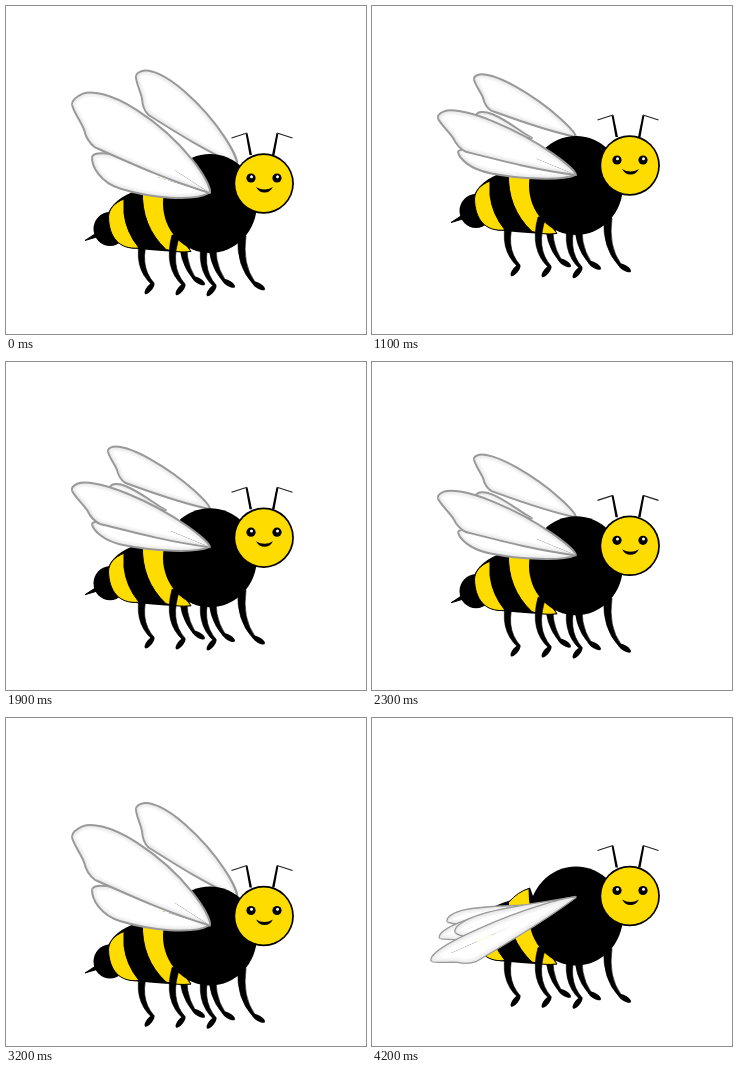
An HTML page with a canvas for the animation above (4300 ms loop, 360 px wide and 328 px high).

```html
<!DOCTYPE html>
<html lang="en">
<head>
<meta charset="utf-8">
<title>Flying bee</title>
<style>
html, body { margin: 0; width: 100%; height: 100%; overflow: hidden; background: #fff; }
canvas { display: block; }
</style>
</head>
<body>
<canvas id="stage" width="360" height="328"></canvas>
<script>
const ctx = document.getElementById('stage').getContext('2d');
const STEP = 100, STEPS = 43;
const YELLOW = '#ffdc00', BLACK = '#000', WING_EDGE = '#999';

// Wing outlines run from the base (0,0) to the tip (1,0); y is a share of the bulge.
const FORE = new Path2D(`M0 0 C.02 .3 .3 1 .65 1 C.85 1 .95 .7 .98 .47 C1 .3 1.01 .1 1 0
  C.98 -.2 .9 -.4 .853 -.63 C.82 -.85 .79 -.98 .74 -1 C.5 -.75 .25 -.5 0 0Z`);
const HIND = new Path2D(`M0 0 C.2 .2 .5 1 .75 1 C.9 1 1 .6 1 0
  C.98 -.4 .88 -1 .7 -1 C.45 -1 .1 -.6 0 0Z`);

const wing = (outline, base, tip, above, below) => ({ outline, base, tip, above, below });

// Each pose lists its wings from back to front.
const UP = {
  back: [wing(FORE, [231, 159], [130, 70], 20.5, 21)],
  front: [
    wing(HIND, [203, 187], [86, 151], 9, 22),
    wing(FORE, [204, 187], [66, 98], 30, 24)
  ]
};
const MID = {
  back: [
    wing(HIND, [160, 150], [104, 127], 7, 6),
    wing(FORE, [204, 149], [102, 91], 14, 19)
  ],
  front: [
    wing(HIND, [203, 187], [86, 164], 6, 14.5),
    wing(FORE, [204, 187], [66, 130], 18, 20.5)
  ]
};
const DOWN = {
  back: [],
  front: [
    wing(HIND, [160, 186], [75, 203], 8, 6),
    wing(FORE, [160, 188], [68, 220], 9, 10),
    wing(HIND, [204, 178], [83, 214], 10, 12),
    wing(FORE, [204, 179], [60, 243], 11, 18)
  ]
};
const FLAP = [UP, MID, DOWN, MID];

// The bee rises, sinks and returns at an even pace.
function heightAt(step) {
  if (step < 10) return -2 * step;
  if (step < 31) return -20 + 42.5 * (step - 10) / 21;
  return 22.5 - 2 * (step - 31);
}

function outline(path, color, width) {
  ctx.strokeStyle = color;
  ctx.lineWidth = width;
  ctx.stroke(path);
}

function shape(d, fill, width = 0) {
  const path = new Path2D(d);
  ctx.fillStyle = fill;
  ctx.fill(path);
  if (width) outline(path, BLACK, width);
}

function ellipse(x, y, rx, ry, fill, angle = 0) {
  ctx.beginPath();
  ctx.ellipse(x, y, rx, ry, angle, 0, Math.PI * 2);
  ctx.fillStyle = fill;
  ctx.fill();
}

// Scales one half of an outline: side 1 is above the axis, -1 below.
function placeWing({ outline, base, tip, above, below }) {
  const dx = tip[0] - base[0], dy = tip[1] - base[1], length = Math.hypot(dx, dy);
  const half = (side, bulge) => {
    const clip = new Path2D(), placed = new Path2D();
    const nx = -dy / length, ny = dx / length;
    const matrix = new DOMMatrix([dx, dy, nx * bulge, ny * bulge, base[0], base[1]]);
    const box = new Path2D();
    box.rect(-1, side > 0 ? 0 : -3, 3, 3);
    clip.addPath(box, matrix);
    placed.addPath(outline, matrix);
    return { clip, placed };
  };
  return [half(1, above), half(-1, below)];
}

function drawWing(spec, edgeWidth) {
  for (const { clip, placed } of placeWing(spec)) {
    ctx.save();
    ctx.clip(clip);
    ctx.fillStyle = '#fff';
    ctx.fill(placed);
    ctx.save();
    ctx.clip(placed);
    for (const width of [9, 5]) outline(placed, 'rgba(120,120,120,.07)', width);
    ctx.restore();
    outline(placed, WING_EDGE, edgeWidth);
    ctx.restore();
  }
}

// Tapered leg, bowed to the left, with an oval foot.
function leg(x, y, ankleX, ankleY, bow, footAngle) {
  const bendX = x - bow, bendY = ankleY - 17;
  shape(`M${x - 4} ${y} Q${bendX - 3} ${bendY} ${ankleX - 1} ${ankleY + 1}
         L${ankleX + 1} ${ankleY - 1} Q${bendX + 3} ${bendY - 2} ${x + 4} ${y} Z`, BLACK, 0.6);
  ellipse(ankleX + Math.cos(footAngle) * 5.5, ankleY + Math.sin(footAngle) * 5.5,
    7.2, 2.8, BLACK, footAngle);
}

function legs(near) {
  for (let i = 0; i < 3; i++) {
    if (near) leg(139 + 31 * i, 229, 147 + 31 * i, 278 + i, 10, 2.25);
    else leg(178 + 29 * i, 230, 188 + 30 * i, 272 + 2.5 * i, 3, 0.55);
  }
}

function body() {
  shape('M79 234.5 L92 226 L94 230 Z', BLACK, 1);
  ellipse(104, 223, 16.5, 17, BLACK);
  // Abdomen, then its two yellow bands.
  shape('M102 207 C108 194 121 187 138 182 Q148 173 158 169 L185 246 Q160 246 133 243 C112 243 99 229 102 207 Z', BLACK);
  shape('M118 193 C108 197 103 203 102.5 211 C103 231 113 244 133 242 Q120 226 118 207 Z', YELLOW, 1);
  shape('M136.5 184 Q146 173 157 170 Q157 211 185 245.5 Q171 247 160 243.5 Q135 220 136.5 184 Z', YELLOW, 1);
  ellipse(204, 197.5, 47, 49.5, BLACK);
}

function head() {
  const middle = 256;
  for (const side of [-1, 1]) {
    const x = offset => middle + side * offset;
    shape(`M${x(12.5)} 149 L${x(16.3)} 128 L${x(14.5)} 127 L${x(10)} 149 Z`, BLACK);
    outline(new Path2D(`M${x(30.5)} 132 L${x(15)} 127`), '#222', 1.2);
  }
  ellipse(257.7, 177.5, 30.2, 30.2, BLACK);
  ellipse(257.7, 177.5, 28.5, 28.5, YELLOW);
  for (const x of [245, 271]) {
    ellipse(x, 172, 4.6, 4.6, BLACK);
    ellipse(x + 0.5, 170.8, 1.5, 1.5, '#fff');
  }
  shape('M250 181 Q258.5 186 267 181 Q264 186.5 258.5 186.5 Q253 186.5 250 181 Z', BLACK);
}

function draw(now) {
  const step = Math.floor(now / STEP) % STEPS;
  const pose = FLAP[step % FLAP.length];
  ctx.fillStyle = '#fff';
  ctx.fillRect(0, 0, 360, 328);
  ctx.save();
  ctx.translate(0, heightAt(step));
  ctx.lineJoin = 'round';
  pose.back.forEach(spec => drawWing(spec, 2));
  legs(false);
  body();
  legs(true);
  pose.front.forEach(spec => drawWing(spec, pose === DOWN ? 1.3 : 2));
  head();
  ctx.restore();
}

const start = performance.now();
function tick() {
  draw(performance.now() - start);
  requestAnimationFrame(tick);
}
tick();
</script>
</body>
</html>
```
